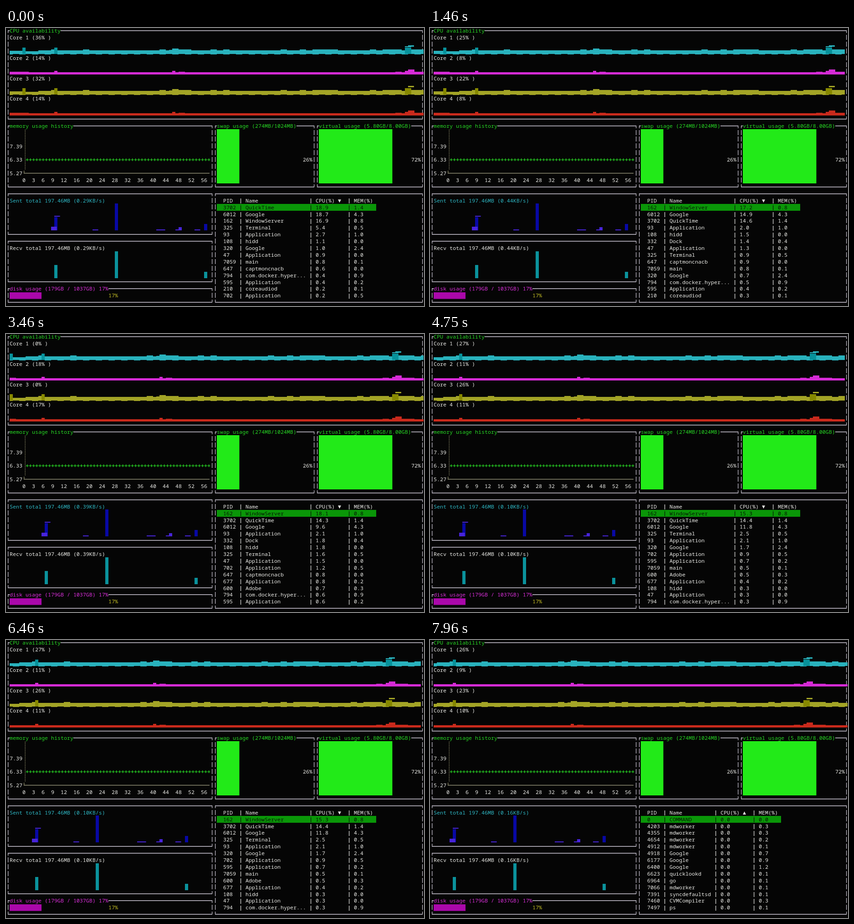
An HTML page with a canvas for the animation above (8000 ms loop, 918 by 610 pixels).

```html
<!DOCTYPE html>
<html lang="en">
<head>
<meta charset="utf-8">
<title>System monitor</title>
<style>
html, body { margin: 0; width: 100%; height: 100%; overflow: hidden; background: #050505; }
canvas { display: block; }
</style>
</head>
<body>
<canvas id="stage" width="918" height="610"></canvas>
<script>
const ctx = document.getElementById('stage').getContext('2d');
const LOOP = 8000, CELL = 7, ROW = 14.9;
const BG = '#050505', WHITE = '#ecece8', BORDER = '#c2bdca', GREEN = '#28da25';
const colX = c => 1 + c * CELL;
const rowY = r => 6.5 + r * ROW;

function rect(x, y, w, h, color) {
  ctx.fillStyle = color;
  ctx.fillRect(x, y, w, h);
}

function text(str, col, row, color = WHITE) {
  ctx.fillStyle = color;
  ctx.fillText(str, colX(col), Math.round(rowY(row) + 3.7));
}

function box(c0, r0, c1, r1, title = '', color = GREEN) {
  const left = colX(c0) + 3, right = colX(c1) + 3;
  for (let r = r0; r <= r1; r++) {
    const y = Math.floor(rowY(r) - 1);
    const top = r === r0 ? 0 : -5, bottom = r === r1 ? 1 : 6;
    if (r === r0 || r === r1) rect(left, y, right - left + 1, 1.6, BORDER);
    for (const x of [left, right]) rect(x, y + top, 1.3, bottom - top, BORDER);
  }
  if (title) {
    rect(colX(c0 + 1), rowY(r0) - 4, title.length * CELL, 8, BG);
    text(title, c0 + 1, r0, color);
  }
}

// Each entry is [time in ms, value]; the value holds until the next entry.
const valueAt = (steps, t) => steps.filter(([start]) => t >= start).pop()[1];

function noise(n) {
  const s = Math.sin(n * 12.9898) * 43758.5453;
  return s - Math.floor(s);
}

const within = (x, from, to) => x >= from && x <= to;
const sampleTimes = [600, 1600, 2600, 3300, 3900, 4600, 6700, 7600];
const coreLoads = [
  [0, '36 14 32 14'], [600, '25 8 22 8'], [1600, '30 11 26 11'],
  [3300, '0 18 0 17'], [3900, '27 11 26 11'], [6700, '26 9 23 10']
];
const cores = [
  { busy: true, color: '#29b2bd', dark: '#07929b' },
  { busy: false, color: '#d62bd6' },
  { busy: true, color: '#a3a426', dark: '#868800' },
  { busy: false, color: '#c92a1c' }
];
const isSpike = s => s === 5 || s === 15 || within(s, 125, 126);

function busyHeight(s) {
  if (within(s, 1, 9)) return s < 6 ? 7 : 6;
  const peak = 4 * Math.exp(-(((s - 52.5) / 1.5) ** 2)) + 3 * Math.exp(-((s - 100.5) ** 2));
  return 8 + Math.round(Math.max(peak, noise(s >> 1) < 0.3 ? 2 : 0));
}

function calmHeight(s) {
  if (within(s, 126, 127)) return 10;
  if (s === 15 || s === 52 || s === 125) return 7;
  return within(s, 1, 6) || noise(s >> 1) < 0.1 ? 5 : 4;
}

function drawCore(core, index, shift, load) {
  const top = 1 + index * 3, base = Math.round(rowY(top + 2) + 5.5);
  const end = shift % 4 ? 911 : 917;
  for (let c = 1; c <= 130; c++) {
    const s = c + shift, x = colX(c);
    const height = core.busy ? busyHeight(s) : calmHeight(s);
    const lift = core.busy && (s >> 1) % 2 ? 1 : 0;
    rect(x, base - height, Math.max(0, Math.min(CELL, end - x)), height + 1 - lift, core.color);
    if (core.busy && isSpike(s)) rect(x, base - 14, CELL, 14, core.dark);
  }
  if (core.busy) {
    const x = colX(126 - shift);
    rect(x, base - 19, 13, 3, core.color);
    if (index === 0) rect(x - CELL, base - 17, 14, 2, core.color);
  }
  text(`Core ${index + 1} (${load}% )`, 1, top);
}

function drawCpu(t) {
  box(0, 0, 130, 13, 'CPU availability');
  const shift = sampleTimes.filter(time => t >= time).length;
  const loads = valueAt(coreLoads, t).split(' ');
  cores.forEach((core, i) => drawCore(core, i, shift, loads[i]));
}

function drawMemory() {
  box(0, 14, 64, 23, 'memory usage history');
  for (let i = 0; i < 3; i++) text((7.39 - i * 1.06).toFixed(2), 1, 17 + i * 2);
  const axis = '#8d8a68';
  for (let y = 223; y < 309; y += 3.7) rect(41.5, y, 1.2, 2.2, axis);
  rect(39, 313, 1.3, 6, axis);
  rect(39, 318, 408, 1.2, '#aaa88a');
  for (let c = 6; c < 64; c++) {
    const x = colX(c) + 3;
    rect(x - 2.5, 288.5, 6, 1.2, GREEN);
    rect(x, 286, 1.2, 6, GREEN);
  }
  for (let n = 0; n <= 56; n += n < 12 ? 3 : 4) text(String(n), 5 + n, 22);
}

function drawGauge(c0, c1, title, width, percent) {
  box(c0, 14, c1, 23, title);
  rect(colX(c0 + 1), 222, width, 119, '#22ea18');
  text(percent, c1 - 3, 19);
}

const netRates = [
  [0, '0.29'], [600, '0.44'], [1600, '0.00'], [2600, '0.39'], [3600, '0.10'], [6600, '0.16']
];

function drawNetwork(t) {
  const shift = Math.floor((t + 400) / 1000);
  const rate = valueAt(netRates, t);
  const bar = (col, base, cells, h, color) => rect(colX(col - shift), base - h, cells * CELL, h, color);
  const peaks = (base, color) => {
    for (const [col, h] of [[15, 29], [34, 59], [62, 14]]) bar(col, base, 1, h, color);
  };
  const violet = '#4824da';

  box(0, 24, 64, 30);
  text(`Sent total 197.46MB (${rate}KB/s)`, 1, 25, '#2fb9c6');
  peaks(444, '#0808a4');
  bar(14, 444, 1.8, 8, violet);
  bar(15, 414, 1.8, 2, violet);
  for (const col of [27, 47, 48, 53, 59]) bar(col, 444, 1.8, 2, violet);
  bar(54, 444, 1, 7, violet);

  box(0, 31, 64, 37);
  text(`Recv total 197.46MB (${rate}KB/s)`, 1, 32);
  peaks(549, '#0b929c');
}

function drawDisk() {
  box(0, 38, 64, 40, 'disk usage (179GB / 1037GB) 17%', '#dc30dc');
  rect(8, 580, 70, 14.5, '#aa08aa');
  text('17%', 32, 39, '#c3bd25');
}

// pid, name, memory share, then CPU share at each poll; idle processes have none.
const processes = `
3702 QuickTime 1.4 18.9 14.6 14.3 14.4
6012 Google 4.3 18.7 14.9 9.6 11.8
162 WindowServer 0.8 16.9 17.2 18.1 15.3
325 Terminal 0.5 5.4 0.9 1.6 2.5
93 Application 1.0 2.7 2.0 2.1 2.1
332 Dock 0.4 0.1 1.4 1.8 0.1
108 hidd 0.0 1.1 1.5 1.8 0.3
320 Google 2.4 1.0 0.7 0.1 1.7
47 Application 0.0 0.9 1.3 1.5 0.3
7059 main 0.1 0.8 0.8 0.1 0.5
647 captmoncnacb 0.0 0.6 0.9 0.8 0.1
794 com.docker.hyper... 0.9 0.4 0.5 0.6 0.3
595 Application 0.2 0.4 0.4 0.6 0.7
210 coreaudiod 0.1 0.2 0.3 0.1 0.1
702 Application 0.5 0.2 0.1 1.2 0.9
677 Application 0.2 0.1 0.1 0.8 0.4
600 Adobe 0.3 0.1 0.1 0.7 0.5
0 COMMAND 0.0
4203 mdworker 0.3
4355 mdworker 0.3
4654 mdworker 0.2
4912 mdworker 0.1
4918 Google 0.7
6177 Google 0.9
6400 Google 1.2
6623 quicklookd 0.1
6964 go 0.1
7066 mdworker 0.1
7391 syncdefaultsd 0.1
7460 CVMCompiler 0.3
7497 ps 0.1`.trim().split('\n').map(row => {
  const [pid, name, mem, ...cpu] = row.split(' ');
  return { pid, name, mem, cpu };
});
const polls = [[0, 0], [600, 1], [2700, 2], [4600, 3]];
const FLIP_TIME = 6700;

function drawTable(t) {
  box(65, 24, 130, 40);
  const ascending = t >= FLIP_TIME, poll = valueAt(polls, t);
  const cpuOf = p => p.cpu[poll] || '0.0';
  const order = ascending ? 1 : -1;
  const rows = [...processes].sort((a, b) => order * (cpuOf(a) - cpuOf(b))).slice(0, 14);
  const cpuCol = ascending ? 91 : 97;

  const line = (cells, row, color = WHITE) => {
    [68, 75, cpuCol, cpuCol + 12].forEach((col, i) => {
      if (i) rect(colX(col - 2) + 3, Math.round(rowY(row)) - 5, 1.2, 11, color);
      text(cells[i], col, row, color);
    });
  };
  line(['PID', 'Name', 'CPU(%)', 'MEM(%)'], 25);
  text(ascending ? '▲' : '▼', cpuCol + 7, 25);
  rect(463, 386, colX(cpuCol + 19) - 463, 15, '#0a9608');
  rows.forEach((p, i) => line([p.pid, p.name, cpuOf(p), p.mem], 26 + i, i ? WHITE : '#051805'));
}

function draw(t) {
  rect(0, 0, 918, 610, BG);
  ctx.font = '11.67px "Noto Sans Mono", "DejaVu Sans Mono", monospace';
  drawCpu(t);
  drawMemory();
  drawGauge(65, 96, 'swap usage (274MB/1024MB)', 49.5, '26%');
  drawGauge(97, 130, 'virtual usage (5.80GB/8.00GB)', 161.5, '72%');
  drawNetwork(t);
  drawDisk();
  drawTable(t);
}

const start = performance.now();
function tick() {
  draw((performance.now() - start) % LOOP);
  requestAnimationFrame(tick);
}
tick();
</script>
</body>
</html>
```
